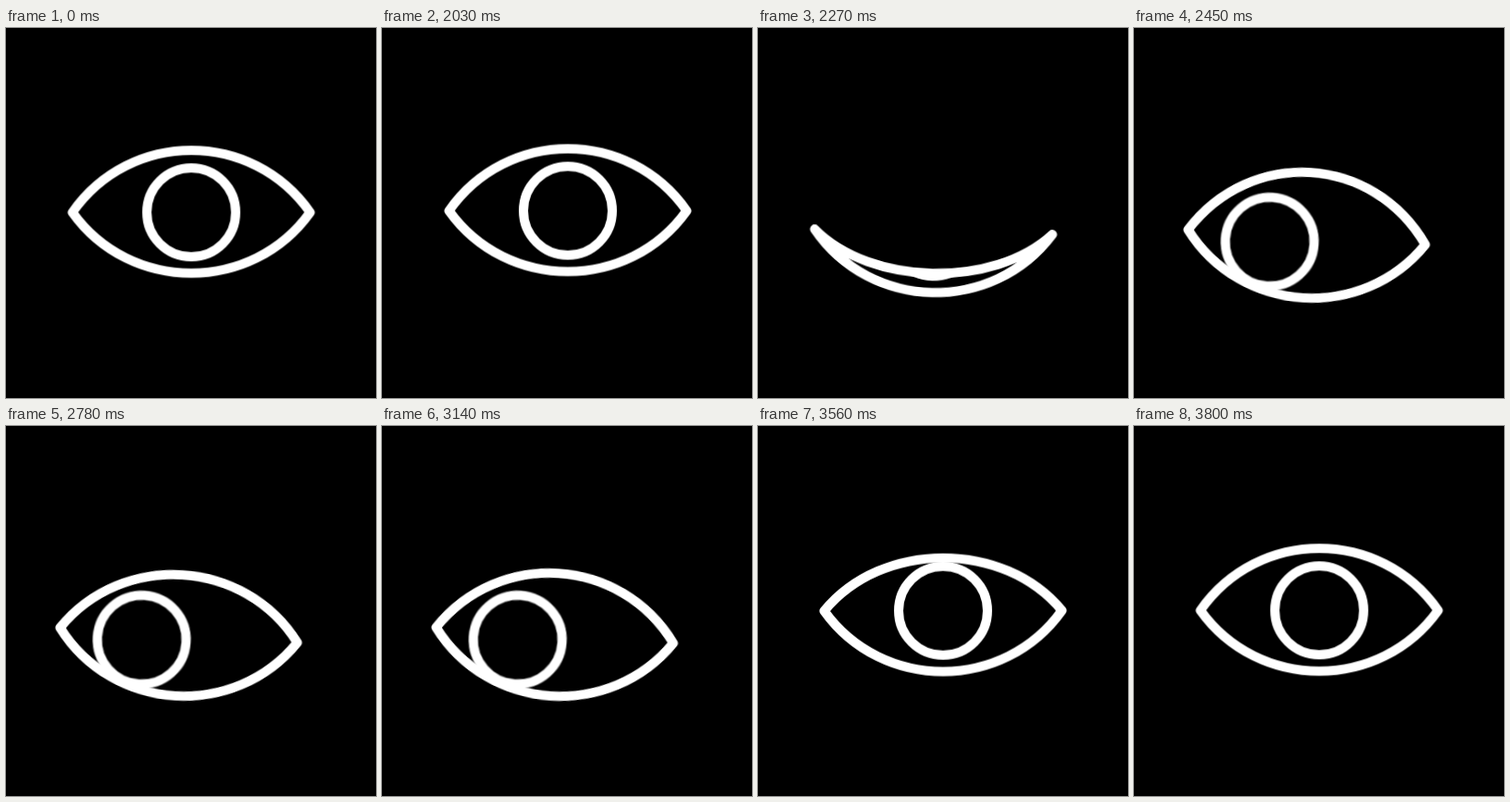
Write an HTML page without scripts that moves like this. It is 400 px wide and 400 px high and loops after 3.89 s.

```html
<!DOCTYPE html>
<html lang="en">
<head>
<meta charset="utf-8">
<title>Blinking eye</title>
<style>
html, body { margin: 0; width: 100%; height: 100%; overflow: hidden; background: #000; }
svg { display: block; width: 100%; height: 100%; }
.line { fill: none; stroke: #fff; stroke-width: 10; stroke-linejoin: round; }
.eye, .iris, .lens { animation: 3890ms linear infinite; }
.eye { animation-name: look; }
.iris { animation-name: glance; }
.lens { animation-name: blink; }

/* whole eye: lift, drop to the lower left, return */
@keyframes look {
  0%, 51.7% { transform: translate(0, 0) rotate(0deg); }
  52.2% { transform: translate(.6px, -1.7px) rotate(0deg); }
  53.7% { transform: translate(1.2px, -5px) rotate(-.3deg); animation-timing-function: ease-in-out; }
  58.4% { transform: translate(-10.6px, 21px) rotate(1.3deg); animation-timing-function: ease-out; }
  63%, 79.9% { transform: translate(-13.6px, 26.8px) rotate(3.6deg); }
  80.7% { transform: translate(-13.6px, 26.9px) rotate(3.8deg); }
  82.6% { transform: translate(-13.6px, 27.3px) rotate(3.8deg); animation-timing-function: ease-in; }
  87.7% { transform: translate(-11.2px, 21.2px) rotate(1.5deg); animation-timing-function: ease-in-out; }
  92.3% { transform: translate(.4px, -.8px) rotate(-.2deg); animation-timing-function: ease-in-out; }
  97.7%, 100% { transform: translate(0, 0) rotate(0deg); }
}

/* iris slides while the lid is down */
@keyframes glance {
  0%, 58.4% { transform: translate(0, 0); animation-timing-function: ease-in-out; }
  62.6%, 84.5% { transform: translate(-39.6px, 7.4px); animation-timing-function: ease-in-out; }
  90.5%, 100% { transform: translate(0, 0); }
}

/* only the upper lid bends */
@keyframes blink {
  0%, 52.2% { d: path("M-128.5 0C-66 -89.3 66 -89.3 128.5 0C66 87.6 -66 87.6 -128.5 0Z"); }
  53.7% { d: path("M-128.5 0C-66 -90.5 66 -90.5 128.5 0C66 87.6 -66 87.6 -128.5 0Z"); animation-timing-function: ease-in-out; }
  58.4% { d: path("M-128.5 0C-66 60 66 60 128.5 0C66 87.6 -66 87.6 -128.5 0Z"); animation-timing-function: ease-out; }
  59.3% { d: path("M-128.5 0C-66 75 66 75 128.5 0C66 87.6 -66 87.6 -128.5 0Z"); animation-timing-function: ease-in-out; }
  63% { d: path("M-128.5 0C-66 -93.3 66 -93.3 128.5 0C66 87.6 -66 87.6 -128.5 0Z"); animation-timing-function: ease-in-out; }
  65.3% { d: path("M-128.5 0C-66 -88 66 -88 128.5 0C66 87.6 -66 87.6 -128.5 0Z"); animation-timing-function: ease-in-out; }
  71% { d: path("M-128.5 0C-66 -87 66 -87 128.5 0C66 87.6 -66 87.6 -128.5 0Z"); animation-timing-function: ease-in-out; }
  79.2% { d: path("M-128.5 0C-66 -88.4 66 -88.4 128.5 0C66 87.6 -66 87.6 -128.5 0Z"); }
  81.2% { d: path("M-128.5 0C-66 -89.6 66 -89.6 128.5 0C66 87.6 -66 87.6 -128.5 0Z"); animation-timing-function: ease-in-out; }
  87.7%, 88.2% { d: path("M-128.5 0C-66 75 66 75 128.5 0C66 87.6 -66 87.6 -128.5 0Z"); animation-timing-function: ease-in-out; }
  92.5% { d: path("M-128.5 0C-66 -93.3 66 -93.3 128.5 0C66 87.6 -66 87.6 -128.5 0Z"); animation-timing-function: ease-in-out; }
  97.7%, 100% { d: path("M-128.5 0C-66 -89.3 66 -89.3 128.5 0C66 87.6 -66 87.6 -128.5 0Z"); }
}
</style>
</head>
<body>
<svg viewBox="0 0 400 400">
  <defs>
    <clipPath id="open">
      <path class="lens" d="M-128.5 0C-66 -89.3 66 -89.3 128.5 0C66 87.6 -66 87.6 -128.5 0Z"/>
    </clipPath>
  </defs>
  <rect width="400" height="400"/>
  <g transform="translate(200.3 199.3)">
    <g class="eye">
      <g clip-path="url(#open)">
        <circle class="line iris" r="48"/>
      </g>
      <path class="line lens" d="M-128.5 0C-66 -89.3 66 -89.3 128.5 0C66 87.6 -66 87.6 -128.5 0Z"/>
    </g>
  </g>
</svg>
</body>
</html>
```
